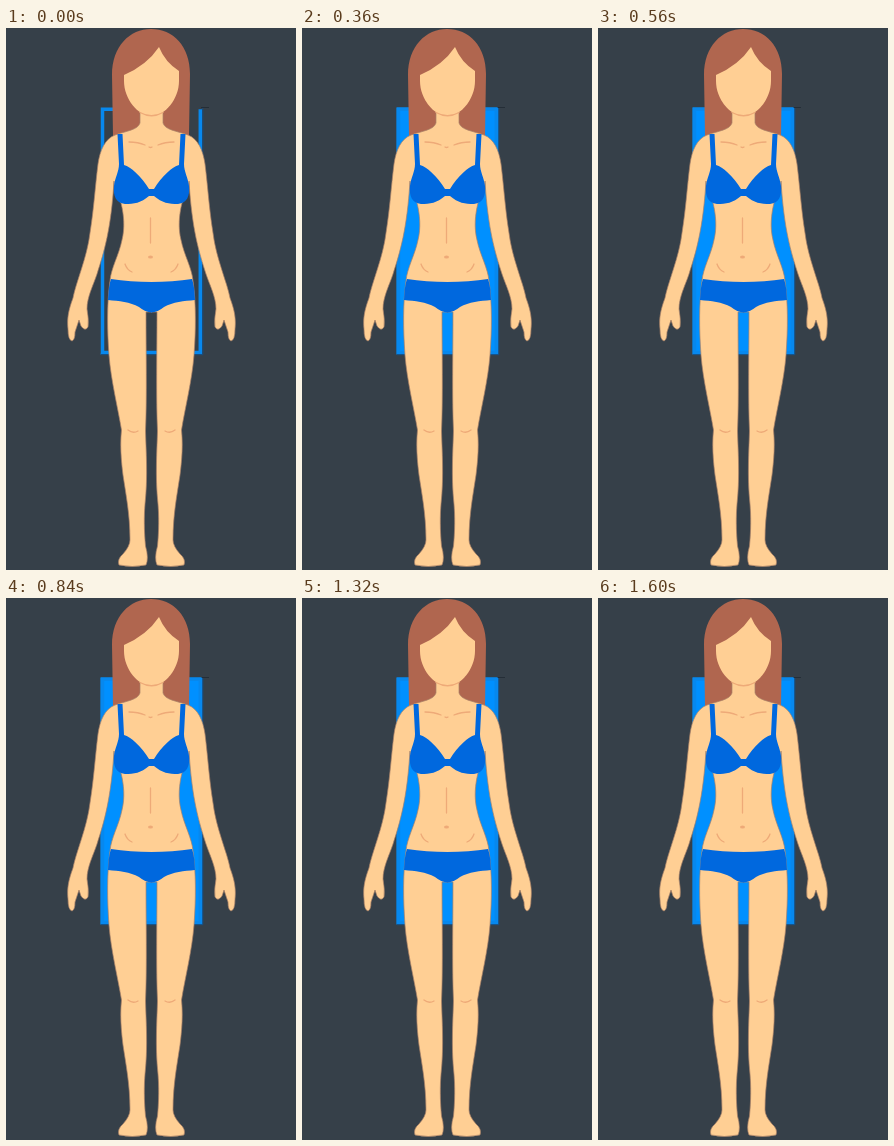
An HTML page for the animation above (1.64 s loop, 290 px wide and 542 px high).

```html
<!DOCTYPE html>
<html lang="en">
<head>
<meta charset="utf-8">
<title>Figure with filling panel</title>
<style>
  html, body { margin: 0; height: 100%; overflow: hidden; background: #364049; }
  svg { display: block; width: 100%; height: 100%; }
</style>
</head>
<body>
<svg viewBox="0 0 290 542">
  <defs>
    <clipPath id="panel"><rect x="94.500" y="79.500" width="102" height="247"/></clipPath>

    <!-- Left half; mirrored about x = 145.5 -->
    <g id="half">
      <path fill="#ffcf94" stroke="#a98267" stroke-width=".7" d="M146 84H134V95C132 102 120 103 109 107
        C99 111 94 122 92 136C89 160 88 180 84 205C81 230 70 254 67 270C62 283 61 292 62 301
        Q62 312 66 313Q69 312 69 304L73 292L75 298Q79 304 82 299Q83 292 81 281
        C81 269 87 258 91 246C98 224 105 202 108 153
        C108 166 111 171 115 175C118 187 119 200 116 212C113 227 105 240 104 253
        C101 274 101 300 103 327C105 353 112 380 115.500 402
        C114 417 115 431 117 447C120 467 124 487 124 512
        Q124 518 117 526Q111 531 113 537Q126 540 140 537Q143 530 139.500 518
        C138 502 138 488 139 476C142 448 140 423 139.500 403
        C141 370 140 325 140 284H146"/>
      <path fill="#0068de" d="M111.500 106H116.500L118 137C125 139 135 148 143 161H146V168H143
        C135 175 128 176 119 176C110 175 107 168 108 158C109 149 113 144 113 136Z"/>
      <path fill="#0068de" d="M105 251Q124 254 146 254V284.500Q139 284 133 279
        C124 274 113 273 102 272Q102 260 105 251Z"/>
      <g fill="none" stroke="#eeaa78" stroke-width="1.300" stroke-linecap="round">
        <path d="M123 114Q132 114 139 117M119 236Q121 242 126 244M122 402Q127 406 132 403"/>
      </g>
    </g>
  </defs>

  <rect width="290" height="542" fill="#364049"/>
  <g clip-path="url(#panel)">
    <path id="fill" fill="#0090ff"/>
  </g>
  <path d="M195 79.500H203" stroke="#252e37"/>
  <path id="frame" fill="none" stroke="#0788ee" stroke-width="3.500"
    d="M194.300 81.300V324.500H96.500V81.300H196"/>
  <path fill="none" stroke="#174f83" d="M196.800 80V326.700H95"/>

  <path fill="#b0664f" d="M107 108L106 47C106 18 124 1 145 1C167 1 184 18 184 46L183 108
    L158 104H134Z"/>
  <use href="#half"/>
  <use href="#half" transform="matrix(-1 0 0 1 291 0)"/>
  <path fill="#ffcf94" d="M118 47Q141 37 153 19Q159 34 173 43V53C173 71 159 88 145.500 88
    S118 71 118 53Z"/>
  <g fill="none" stroke="#eeaa78" stroke-width="1.300" stroke-linecap="round">
    <path d="M134 84.500Q145.500 91 157 84.500M143 119Q144.500 120 146 119M144.500 190V215"/>
  </g>
  <ellipse cx="144.500" cy="229" rx="2.500" ry="1.500" fill="#eeaa78"/>
</svg>
<script>
  const LOOP = 1640, SLOPE = 2.3;
  const fill = document.getElementById('fill');
  const frame = document.getElementById('frame');
  // Frame length, and the last stretch that closes its top right corner
  const length = frame.getTotalLength(), gap = 14;

  function draw(now) {
    const t = Math.floor((now % LOOP) / 40) * 40;
    frame.setAttribute('stroke-dasharray', t < 40 ? `${length - gap} ${length}` : 'none');

    // A diagonal edge sweeps from the bottom left to the top right corner
    const p = Math.min(1, Math.max(0, (t - 100) / 260));
    const edge = x => 327 + SLOPE * (x - 95) - p * (248 + SLOPE * 102);
    fill.setAttribute('d', `M94 ${edge(94)}L197 ${edge(197)}V600H94Z`);
    requestAnimationFrame(draw);
  }
  draw(0);
</script>
</body>
</html>
```
